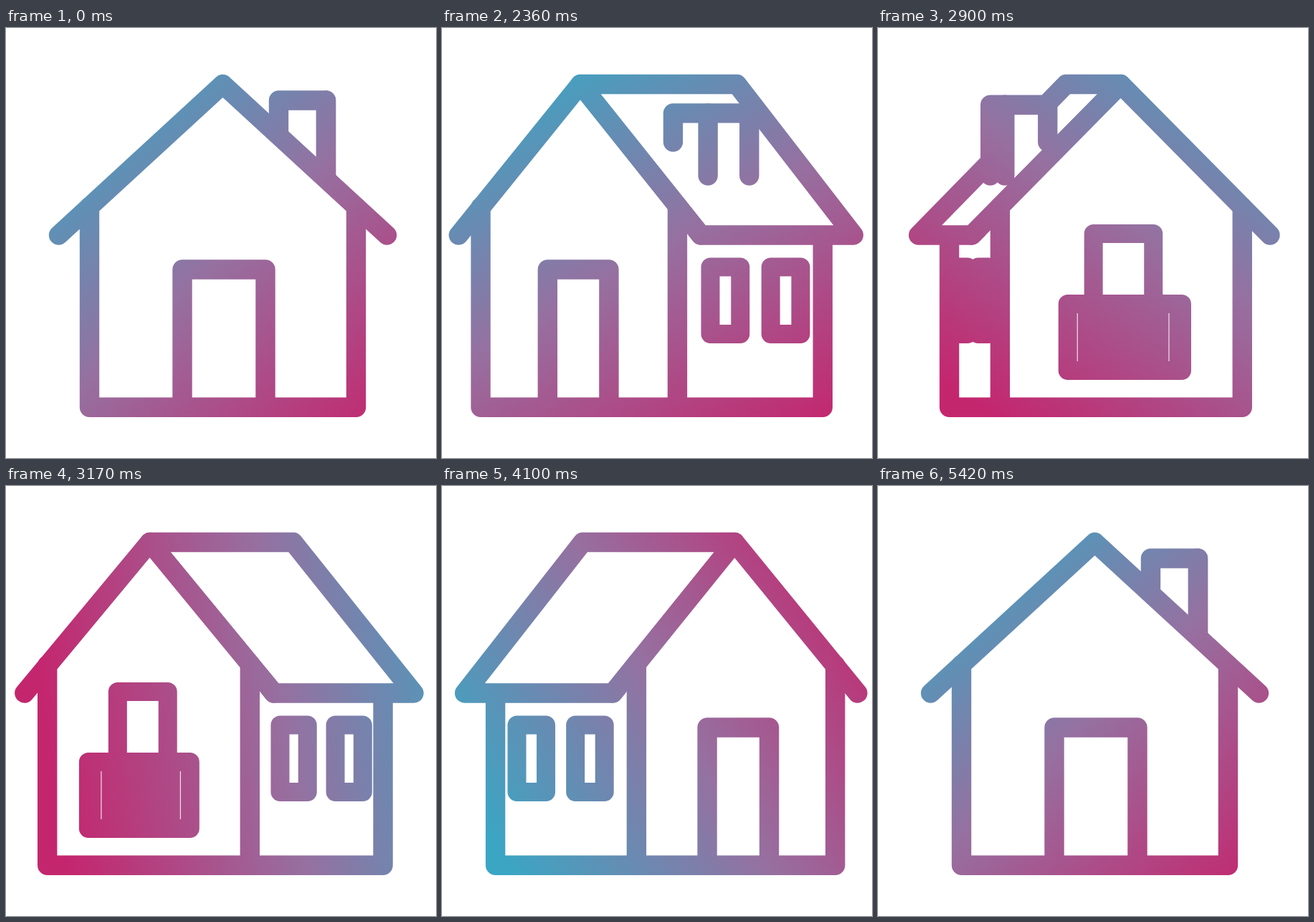
Recreate the animation shown at these times as an HTML page with a canvas. Size 600x600 px, loop 5.45 s.

```html
<!DOCTYPE html>
<html lang="en">
<head>
<meta charset="utf-8">
<title>Turning house</title>
<style>
  html, body { margin: 0; width: 100%; height: 100%; overflow: hidden; background: #fff; }
  canvas { display: block; width: 600px; height: 600px; }
</style>
</head>
<body>
<canvas id="stage" width="600" height="600"></canvas>
<script>
const ctx = document.getElementById('stage').getContext('2d');

const LOOP = 5450, START = 2000, STEP = 30, TURN = 3420;
const RIDGE = 78.5, EAVE = 289, FLOOR = 529.3;
const WALL_HALF = 186, EAVE_HALF = 229;
const LINE = 27.4, THIN = 26;

// Offsets of each part at 0, 45 and 90 degrees from the facing gable
const POSE = {
  apex: [0, 122, 187],
  eave: [0, 123, 262],
  wall: [0, 124, 222],
  farWall: [186, 234, 222],
  farEave: [229, 277, 262],
  wallTop: [250, 250, 289],
  nearWindow: [.33, .33, .24],
  boxShift: [0, 16, 22],
  archShift: [0, 10, 3],
  archTop: [287, 287, 302]
};

const lerp = (a, b, k) => a + (b - a) * k;

function along(keys, m) {
  const i = Math.min(Math.floor(m), keys.length - 2);
  return lerp(keys[i], keys[i + 1], m - i);
}

// Straight blend between eighth turns
function eighths(fn, u) {
  const i = Math.floor(u);
  return lerp(fn(i * Math.PI / 4), fn((i + 1) * Math.PI / 4), u - i);
}

// Cubic ease with control points (x1, 0) and (x2, 1)
function ease(x, x1, x2) {
  if (x <= 0) return 0;
  if (x >= 1) return 1;
  let lo = 0, hi = 1;
  for (let i = 0; i < 30; i++) {
    const t = (lo + hi) / 2, r = 1 - t;
    if (3 * x1 * t * r * r + 3 * x2 * t * t * r + t * t * t < x) lo = t; else hi = t;
  }
  return lo * lo * (3 - 2 * lo);
}

function trace(points) {
  ctx.beginPath();
  points.forEach(([x, y], i) => i ? ctx.lineTo(x, y) : ctx.moveTo(x, y));
}

function fill(points, paint = '#fff') {
  trace(points);
  ctx.fillStyle = paint;
  ctx.fill();
}

function line(points, width = LINE, closed = false) {
  trace(points);
  if (closed) ctx.closePath();
  ctx.lineWidth = width;
  ctx.stroke();
}

const box = (l, t, r, b) => [[l, t], [r, t], [r, b], [l, b]];

function setPaint(k) {
  const a = (48 + 360 * k) * Math.PI / 180;
  const dx = Math.cos(a), dy = Math.sin(a), x = 357, y = 312;
  const g = ctx.createLinearGradient(x - 345 * dx, y - 345 * dy, x + 300 * dx, y + 300 * dy);
  g.addColorStop(0, '#3aa6c4');
  g.addColorStop(.49, '#9670a0');
  g.addColorStop(1, '#c4266e');
  ctx.strokeStyle = g;
}

function drawChimney(u, cx) {
  const c = eighths(Math.cos, u), s = eighths(Math.sin, u);
  const high = 78, low = 144, front = 59, back = -32;
  let corners;
  if (u < 2) corners = [[high, front], [low, front], [low, back]];
  else if (u <= 4) corners = [[low, front], [low, back], [high, back]];
  else corners = [[high, u > 6 ? front : back], [low, u > 6 ? front : back]];
  const top = along([101, 121, 121, 121, 101, 190, 190, 190, 101], u);
  const at = corners.map(([x, z]) => [cx + x * c - z * s, x === high ? 159 : 206]);
  const tops = at.map(([x]) => [x, top]);
  const outline = [at[0], ...tops, at[at.length - 1]];
  fill(outline);
  line(outline);
  at.slice(1, -1).forEach(p => line([[p[0], top], p]));
}

// Box and arch that stand out from the rear wall
function drawRear(p, x, dir, g, s, m, facing) {
  const mid = x + dir * p.boxShift;
  const half = 85 * g + 11 * s;
  const l = mid - half, r = mid + half;
  const body = box(l, 385, r, 478);
  fill(body, ctx.strokeStyle);
  line(body, THIN, true);
  if (!facing) return;
  const slit = sx => fill(box(sx - .5, 398, sx + .5, 465));
  if (half > 20) slit(dir < 0 ? r - 13.5 : l + 13.5);
  if (m < 1) slit(dir < 0 ? l + 18 : r - 18);
  const arch = x + dir * p.archShift, w = 46 * g;
  line([[arch - w, 380], [arch - w, p.archTop], [arch + w, p.archTop], [arch + w, 380]], THIN);
}

function drawSide(p, X, dir, g) {
  const nearWall = X(dir * (p.wall - WALL_HALF * g)), farWall = X(-dir * p.farWall);
  const nearEave = X(dir * (p.eave - EAVE_HALF * g)), farEave = X(-dir * p.farEave);
  const wide = farWall - nearWall;
  fill(box(nearWall, EAVE, farWall, FLOOR));
  line([[nearWall, FLOOR], [farWall, FLOOR], [farWall, EAVE]]);
  [p.nearWindow, .745].forEach(k => {
    const x = nearWall + wide * k, h = Math.abs(wide) * .103;
    line(box(x - h, 333.5, x + h, 427), THIN, true);
  });
  const roof = [[X(dir * p.apex), RIDGE], [X(-dir * p.apex), RIDGE], [farEave, EAVE], [nearEave, EAVE]];
  fill(roof);
  line(roof, LINE, true);
}

function drawGable(p, X, dir, g) {
  const wallNear = p.wall - WALL_HALF * g, eaveNear = p.eave - EAVE_HALF * g;
  const near = X(dir * wallNear), far = X(dir * (p.wall + WALL_HALF * g));
  const roof = [
    [X(dir * eaveNear), EAVE],
    [X(dir * p.apex), RIDGE],
    [X(dir * (p.eave + EAVE_HALF * g)), EAVE]
  ];
  fill([...roof, [far, EAVE], [far, FLOOR], [near, FLOOR], [near, EAVE]]);
  line(roof);
  // The near wall ends where it meets the slope
  const k = Math.min(1, (p.apex - wallNear) / (p.apex - eaveNear));
  line([[near, lerp(RIDGE, EAVE, k)], [near, FLOOR], [far, FLOOR], [far, p.wallTop]]);
}

function drawHouse(u) {
  const front = u < 2 || u > 6;
  const a = front ? (u > 6 ? u - 8 : u) : u - 4;
  const m = Math.abs(a), dir = a > 0 ? -1 : 1;
  const g = Math.abs(eighths(Math.cos, u)), s = Math.abs(eighths(Math.sin, u));
  const cx = 301.5 + Math.cos(u * Math.PI / 4);
  const X = v => cx + v;
  const p = {};
  for (const key in POSE) p[key] = along(POSE[key], m);

  if (u > 4) drawChimney(u, cx);
  if (front && m > 1.4) drawRear(p, X(-dir * (p.farWall - WALL_HALF * g)), -dir, g, s, m, false);
  if (m > .015) drawSide(p, X, dir, g);
  if (u <= 4) drawChimney(u, cx);
  drawGable(p, X, dir, g);
  if (front) {
    const x = X(dir * p.wall * 1.02 + 1.5 * g), w = 58 * g;
    line([[x - w, FLOOR], [x - w, 337], [x + w, 337], [x + w, FLOOR]]);
  } else {
    drawRear(p, X(dir * p.wall), dir, g, s, m, true);
  }
}

function render(ms) {
  const t = Math.floor((ms % LOOP - START) / STEP) * STEP;
  const x = Math.min(1, Math.max(0, t / TURN));
  ctx.fillStyle = '#fff';
  ctx.fillRect(0, 0, 600, 600);
  ctx.lineCap = ctx.lineJoin = 'round';
  setPaint(ease(x, .34, .4725));
  drawHouse(8 * ease(x, .183, .239) % 8);
}

const begin = performance.now();
function tick() {
  render(performance.now() - begin);
  requestAnimationFrame(tick);
}
tick();
</script>
</body>
</html>
```
